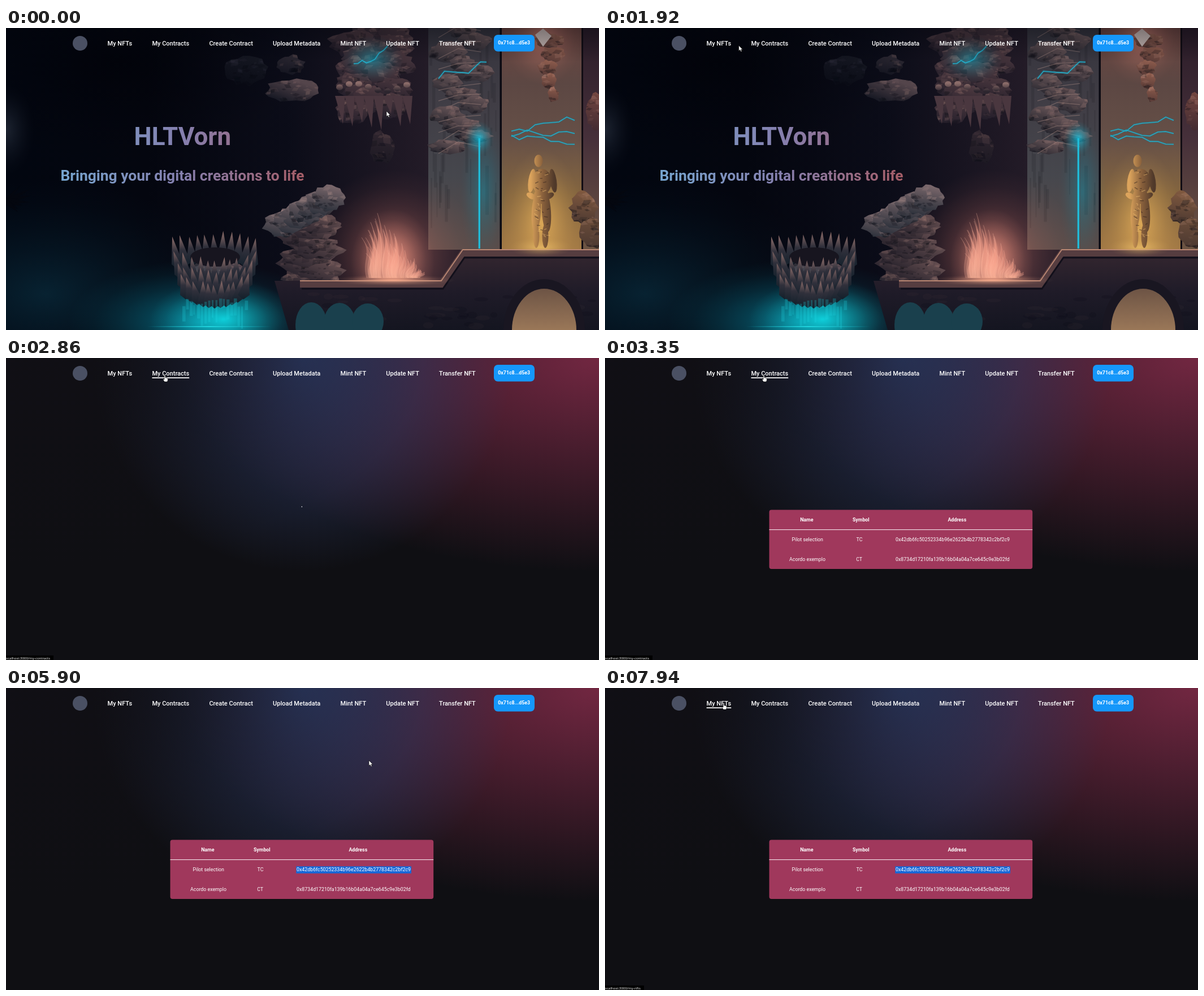
These frames come from a looping animation (1049 px wide and 534 px high, 8000 ms). An HTML page with a canvas:

```html
<!DOCTYPE html>
<html lang="en">
<head>
<meta charset="utf-8">
<title>Contracts</title>
<style>
  html, body { margin: 0; width: 100%; height: 100%; overflow: hidden; background: #0f0f13; }
  canvas, #mesh, svg { position: absolute; left: 0; top: 0; width: 1049px; height: 534px; }
  #mesh {
    background:
      radial-gradient(at 0% 0%, hsl(253 16% 7%) 0, transparent 50%),
      radial-gradient(at 50% 0%, hsl(225 39% 30%) 0, transparent 50%),
      radial-gradient(at 100% 0%, hsl(339 49% 30%) 0, transparent 50%),
      #0f0f13;
  }
  text { font-family: Roboto, sans-serif; fill: #fff; }
  .nav { font-size: 11px; font-weight: 500; }
  .hero { font-weight: 700; fill: url(#heroFill); text-anchor: middle; }
  .cell { font-size: 8.8px; text-anchor: middle; }
  .bold { font-size: 8.8px; font-weight: 700; text-anchor: middle; }
  #url { font: 6.1px "Open Sans", sans-serif; }
</style>
</head>
<body>
<canvas id="art" width="1049" height="534"></canvas>
<div id="mesh"></div>
<svg viewBox="0 0 1049 534">
  <defs>
    <linearGradient id="heroFill" gradientUnits="userSpaceOnUse" x1="95" y1="0" x2="529" y2="0">
      <stop offset="0" stop-color="#76a5cf"/>
      <stop offset=".5" stop-color="#857fae"/>
      <stop offset="1" stop-color="#a55d66"/>
    </linearGradient>
  </defs>
  <circle cx="131" cy="27" r="13" fill="#4a5063"/>
  <g id="nav"></g>
  <rect x="863" y="12" width="72" height="29.5" rx="7" fill="#1597fa"/>
  <text class="bold" x="898.7" y="29.4">0x71c8...d5e3</text>

  <g id="hero">
    <text class="hero" x="312.3" y="206.5" font-size="44">HLTVorn</text>
    <text class="hero" x="312" y="269.5" font-size="26.4">Bringing your digital creations to life</text>
  </g>

  <circle id="loader" cx="523.3" cy="263" fill="none" stroke="#fff"/>
  <g id="table">
    <rect x="290.5" y="268.5" width="465.7" height="104.5" rx="4" fill="#a0385c"/>
    <rect x="290.5" y="303" width="465.7" height="1.1" fill="#f3e4ea"/>
    <text class="bold" x="356.8" y="288.6">Name</text>
    <text class="bold" x="452.8" y="288.6">Symbol</text>
    <text class="bold" x="622.8" y="288.6">Address</text>
    <rect id="selection" x="513.3" y="315.3" width="203.7" height="12.5" fill="#1768d8"/>
    <text class="cell" x="358.2" y="324.1">Pilot selection</text>
    <text class="cell" x="450" y="324.1">TC</text>
    <text class="cell" x="615" y="324.1">0x42db6fc50252334b96e2622b4b2778342c2bf2c9</text>
    <text class="cell" x="358" y="358.6">Acordo exemplo</text>
    <text class="cell" x="449.6" y="358.6">CT</text>
    <text class="cell" x="614.8" y="358.6">0x8734d17210fa139b16b04a04a7ce645c9e3b02fd</text>
  </g>

  <g id="status">
    <rect id="urlBox" y="526" height="8" fill="#000"/>
    <text id="url" x="-.5" y="532.6"></text>
  </g>
  <g id="cursor" stroke-linejoin="round">
    <path id="arrow" d="M0 0V9.6L2.2 7.6 3.8 11 5.4 10.2 3.9 7H6.8Z" fill="#fff" stroke="#000" stroke-width=".6"/>
    <path id="hand" d="M-1 0Q0-1 1 0V4Q5 3.5 5.3 6V8.5L4.2 11H-.6L-3.3 7Q-3.2 5.8-1 7Z" fill="#fff" stroke="#000" stroke-width=".6"/>
    <path id="beam" d="M-2-4.5H2M0-4.5V4.5M-2 4.5H2" fill="none" stroke="#fff"/>
  </g>
</svg>
<script>
const $ = id => document.getElementById(id);
const clamp = v => Math.max(0, Math.min(1, v));

/* ---------- scene ---------- */
const c = $('art').getContext('2d');
let seed = 7;
const rnd = (a = 0, b = 1) => {
  seed = (seed * 1664525 + 1013904223) % 4294967296;
  return a + (b - a) * seed / 4294967296;
};
const repeat = (n, fn) => { for (let i = 0; i < n; i++) fn(i, i / (n - 1)); };
const hex = v => Math.round(v * 255).toString(16).padStart(2, '0');

function shade(x0, y0, x1, y1, ...colors) {
  const g = c.createLinearGradient(x0, y0, x1, y1);
  colors.forEach((col, i) => g.addColorStop(i / (colors.length - 1), col));
  return g;
}
function box(x, y, w, h, fill) {
  c.fillStyle = fill;
  c.fillRect(x, y, w, h);
}
function oval(x, y, rx, ry, fill, turn = 0) {
  c.beginPath();
  c.ellipse(x, y, rx, ry, turn, 0, 7);
  c.fillStyle = fill;
  c.fill();
}
function glow(x, y, rx, ry, color, alpha) {
  c.save();
  c.translate(x, y);
  c.scale(rx, ry);
  const g = c.createRadialGradient(0, 0, 0, 0, 0, 1);
  repeat(6, (i, k) => g.addColorStop(k, color + hex(alpha * (1 - k) ** 1.5)));
  box(-1, -1, 2, 2, g);
  c.restore();
}
function trace(...p) {
  c.beginPath();
  for (let i = 0; i < p.length; i += 2) c.lineTo(p[i], p[i + 1]);
}
function poly(fill, ...p) {
  trace(...p);
  c.fillStyle = fill;
  c.fill();
}
function line(color, width, ...p) {
  trace(...p);
  c.strokeStyle = color;
  c.lineWidth = width;
  c.stroke();
}
// Ragged stone, lit from above, broken into random facets
function rock(x, y, rx, ry, top, bottom, light = '#d9a596') {
  const rim = [];
  repeat(22, i => {
    const a = i / 22 * 2 * Math.PI, r = rnd(.8, 1.1);
    rim.push(x + Math.cos(a) * rx * r, y + Math.sin(a) * ry * r);
  });
  c.save();
  poly(shade(x, y - ry, x - rx * .3, y + ry, top, bottom), ...rim);
  c.clip();
  repeat(Math.ceil(rx * ry / 28) + 5, () => {
    const fx = x + rnd(-rx, rx), fy = y + rnd(-ry, ry), s = rnd(2, 10), a = rnd(-.8, .8);
    const dx = Math.cos(a) * s, dy = Math.sin(a) * s;
    const lit = rnd(-1, 1) > (fy - y) / ry;
    poly(lit ? light + hex(rnd(.04, .18)) : '#05070f' + hex(rnd(.1, .35)),
      fx - dx, fy - dy, fx + dy, fy - s * .4, fx + dx, fy + dy, fx - dy, fy + s * .4);
  });
  c.restore();
}
// Jittery bolt drawn as a wide halo with a thin core
function bolt(x0, y0, x1, y1, jitter) {
  const p = [];
  repeat(9, (i, k) => p.push(x0 + (x1 - x0) * k, y0 + (y1 - y0) * k + rnd(-jitter, jitter)));
  line('#0f829f50', 4, ...p);
  line('#25b4d0', 1.3, ...p);
}

function backdrop() {
  box(0, 0, 1049, 534, shade(0, 0, 747, 0, '#020610', '#04060f', '#0b0c18', '#231b27'));
  glow(200, 60, 340, 190, '#010208', .7);
  glow(70, 470, 330, 200, '#0a3143', .65);
  glow(0, 180, 50, 80, '#28303f', .7);
  repeat(9, i => poly('#04070f', 0, 300, rnd(20, 46), 278 + i * 6, 0, 312));
}
function pillars() {
  box(747, 0, 127, 392, shade(0, 0, 0, 392, '#35343d', '#403d45', '#46474d', '#5a4c49'));
  box(877, 0, 142, 392, shade(0, 0, 0, 392, '#6b4540', '#5c4743', '#665047', '#85663f', '#a37a45'));
  box(1021, 0, 28, 392, shade(0, 0, 0, 392, '#2a1c28', '#46303a', '#6d5543'));
  glow(948, 345, 72, 130, '#f2b95c', .75);
  glow(950, 15, 70, 85, '#c4786a', .8);
  repeat(40, () => box(rnd(748, 866), rnd(0, 300), rnd(1, 6), rnd(20, 90), '#16181f28'));

  repeat(12, (i, k) => {
    const y = 5 + 205 * k;
    rock(805 + 28 * Math.sin(i * 2.1), y, rnd(22, 36), rnd(12, 20), '#655356', '#2b2931');
    line('#b5918a70', 1.2, 765, y + 12, 800, y + rnd(-10, 6), 840, y);
  });
  bolt(765, 85, 850, 65, 9);
  glow(845, 290, 42, 130, '#178aa0', .5);
  glow(837, 195, 26, 30, '#18c6e4', .8);
  box(835.7, 195, 3.2, 195, '#20bdda');
  box(873.5, 0, 3.5, 392, '#0b0a12');
  box(1018, 0, 3, 392, '#120d14');

  repeat(3, i => bolt(894, 190, 1006, 157 + i * 26, 8));
  repeat(5, i => rock(962 + 6 * Math.sin(i * 2), 22 + i * 24, 26 - 4 * i, 14, '#8c5b4c', '#573a36'));
  poly('#c5b6b2', 936, 12, 950, 1, 965, 14, 950, 33);
  rock(1046, 148, 20, 38, '#754741', '#3f2930');
  rock(1022, 318, 25, 30, '#80593f', '#4b3831');
  rock(1036, 362, 22, 28, '#6d4e3a', '#4b3831');
}
function stones() {
  rock(425, 76, 40, 26, '#141620', '#0a0c16', '#454357');
  rock(503, 65, 26, 17, '#2b2731', '#141520');
  rock(507, 110, 48, 20, '#54454b', '#191a25');
  repeat(16, (i, k) => {
    const y = 8 + 140 * k;
    rock(650 + 38 * Math.sin(i * 2.4), y, 44 - 14 * k, 24, '#4a373e', '#221d29');
  });
  repeat(8, i => {
    const x = 590 + i * 17;
    oval(x, 105 - 7 * Math.sin(i), 6, 5, shade(0, 98, 0, 112, '#8b6c69', '#2c252e'));
    poly('#4a373f', x - 8, 120, x + 10, 120, x + 6, rnd(150, 182));
  });
  rock(666, 212, 22, 30, '#30262f', '#1b1822');
  glow(648, 55, 55, 42, '#149fb6', .6);
  bolt(615, 70, 675, 38, 8);
}
function fire() {
  glow(684, 400, 150, 150, '#c56f63', .65);
  glow(684, 415, 74, 95, '#f79b86', .95);
  repeat(50, () => {
    const off = rnd(-1, 1), x = 685 + off * 44, y = 442;
    const h = 115 * (1 - .6 * Math.abs(off + .5)) * rnd(.45, 1);
    const tip = x + off * 12, w = rnd(2, 6);
    c.beginPath();
    c.moveTo(x - w, y);
    c.bezierCurveTo(x - w - 9, y - h * .45, x + w + 5, y - h * .6, tip, y - h);
    c.bezierCurveTo(x + w + 10, y - h * .5, x - w + 5, y - h * .35, x + w, y);
    c.fillStyle = shade(0, y - h, 0, y, '#e5877560', '#f9a58e48', '#ffb59a38');
    c.fill();
    c.strokeStyle = '#ffbfa540';
    c.lineWidth = .7;
    c.stroke();
  });
}
function column() {
  repeat(9, (i, k) => rock(538 + 14 * Math.sin(i * 1.9), 440 - 95 * k, 50 - 5 * k, 18, '#5c484b', '#2d262f'));
  repeat(7, (i, k) => rock(490 + 82 * k, 348 - 48 * k, 36 - 6 * k, 22, '#7b686c', '#2e323c', '#e0b5a8'));
}
function bloom() {
  glow(340, 520, 230, 110, '#08849c', .85);
  glow(385, 515, 130, 70, '#0fd5e0', .95);
  rock(368, 445, 60, 44, '#54424a', '#1d4756');
  // back row of petals first, then lower and shorter rows
  repeat(4, row => repeat(11, (i, k) => {
    const side = 2 * k - 1, x = 369 + side * (66 - row * 5);
    const y = 398 + row * 18 + 16 * (1 - side * side) * (row ? 1 : -.6), h = 30 - row * 3;
    poly(shade(0, y - h, 0, y + 26, '#96736e', '#30303b', '#15212c'),
      x - 10, y + 20, x + side * 9 + rnd(-4, 4), y - h + rnd(0, 8), x + 11, y + 20, x, y + 28);
    if (i === 10 && !row) oval(370, 405, 44, 17, '#17151f');
  }));
  repeat(18, i => box(312 + i * 6.5, 478 + rnd(0, 16), rnd(2, 6), rnd(15, 40), '#1fd9e33c'));
  box(250, 527, 220, 2, shade(250, 0, 470, 0, '#17b0c000', '#20d4dd', '#17b0c000'));
}
function platform() {
  poly(shade(0, 400, 0, 534, '#33262f', '#1f1b28', '#141520'),
    475, 447, 772, 447, 812, 400, 1049, 400, 1049, 534, 500, 534);
  repeat(60, i => oval(rnd(520, 1040), rnd(468, 530), rnd(6, 18), rnd(2, 6), i % 2 ? '#6b4a5214' : '#07081528'));
  repeat(3, i => oval(540 + i * 50, 525 - i * 3, 28, 40 - i * 4, '#1a404d'));
  const edge = [520, 447, 770, 447, 808, 392, 1049, 392];
  const lower = edge.map((v, i) => i % 2 ? v + 6 : v);
  line('#563d40', 12, ...lower);
  line('#b98672', 1.8, ...edge);
  line('#110f1a', 3, ...lower.map((v, i) => i % 2 ? v + 8 : v + 3));
  glow(685, 446, 110, 10, '#ffb08e', .8);
  oval(952, 534, 72, 90, '#191621');
  oval(952, 534, 57, 73, shade(0, 461, 0, 534, '#6d5445', '#9a7758'));
}
function figure() {
  const metal = shade(928, 0, 970, 0, '#dca45c', '#8a613c', '#50392a');
  glow(946, 388, 55, 18, '#f3c56d', .6);
  for (const side of [-1, 1]) {
    oval(947 + side * 9, 325, 8, 36, metal, side * -.06);
    oval(946 + side * 8, 368, 5.5, 21, metal);
    oval(949 + side * 19, 270, 6, 21, metal, side * -.15);
    oval(945 + side * 16, 297, 9, 5, metal, side * -.5);
  }
  oval(948, 272, 17, 23, metal);
  oval(947, 297, 13, 14, metal);
  oval(942, 235, 7.5, 11, metal);
  repeat(36, i => {
    const x = rnd(934, 958), y = rnd(252, 375);
    line(i % 2 ? '#f5c47470' : '#30211c80', 1.4, x, y, x + rnd(2, 7), y + rnd(-3, 4));
  });
}
backdrop();
pillars();
stones();
fire();
column();
bloom();
platform();
figure();
box(0, 0, 1049, 60, shade(0, 0, 0, 60, '#02040b60', '#02040b00'));

/* ---------- interface ---------- */
let left = 179.6;
const links = 'My NFTs,My Contracts,Create Contract,Upload Metadata,Mint NFT,Update NFT,Transfer NFT'.split(',').map(name => {
  $('nav').insertAdjacentHTML('beforeend',
    `<text class="nav" x="${left}" y="30.6">${name}</text><rect x="${left}" y="34.2" height="1.7" fill="#fff"/>`);
  const bar = $('nav').lastElementChild, x = left;
  const width = bar.previousElementSibling.getComputedTextLength();
  left += width + 35.2;
  return { bar, x, width };
});

// Pointer stops: time, x, y
const path = [
  [0, 673, 147], [860, 776, 31], [1100, 770, 28], [1650, 241, 31], [2120, 234, 31], [2400, 281, 31], [3400, 281, 31],
  [4220, 495, 326], [4300, 519, 326], [4700, 541, 324.5], [5500, 541, 324.5], [5700, 724, 215], [5900, 642, 128],
  [6180, 298, 95], [6320, 386, 92], [7150, 212, 30], [8000, 210, 27]
];
function pointer(t) {
  const i = path.findIndex(stop => stop[0] > t);
  const [t0, x0, y0] = path[i - 1], [t1, x1, y1] = path[i];
  const u = (t - t0) / (t1 - t0), k = u * u * (3 - 2 * u);
  return [x0 + (x1 - x0) * k, y0 + (y1 - y0) * k];
}
const over = (link, [x, y]) => y > 18 && y < 38 && x >= link.x && x <= link.x + link.width;

// Underlines grow while hovered and shrink back afterwards
function growth(link, t) {
  let g = 0;
  for (let s = 0; s < t; s += 10) g = clamp(g + (over(link, pointer(s)) ? 1 : -1) / 33);
  return g * (2 - g);
}
const show = (id, on) => $(id).style.display = on ? '' : 'none';

function draw(t) {
  const home = t < 2858, loaded = t >= 3300;
  show('art', home);
  show('hero', home);
  show('mesh', !home);
  show('loader', !home && !loaded);
  show('table', loaded);
  show('selection', t >= 5100);

  const k = clamp((t - 2858) / 900);
  $('loader').setAttribute('r', .4 + 14 * k);
  $('loader').setAttribute('stroke-opacity', 1 - k);

  for (const link of links) link.bar.setAttribute('width', link.width * growth(link, t));

  const first = t < 5000;
  show('status', first ? t > 2450 && t < 3560 : t > 7500);
  $('urlBox').setAttribute('width', first ? 84 : 69);
  $('url').textContent = 'ocalhost:3000/' + (first ? 'my-contracts' : 'my-nfts');

  const p = pointer(t), [x, y] = p;
  const link = links.some(l => over(l, p));
  const typed = loaded && x > 513 && x < 717 && y > 315 && y < 334;
  show('hand', link);
  show('beam', typed);
  show('arrow', !link && !typed);
  $('cursor').setAttribute('transform', `translate(${x} ${y})`);
}
const start = performance.now();
(function loop() {
  draw((performance.now() - start) % 8000);
  requestAnimationFrame(loop);
})();
</script>
</body>
</html>
```
